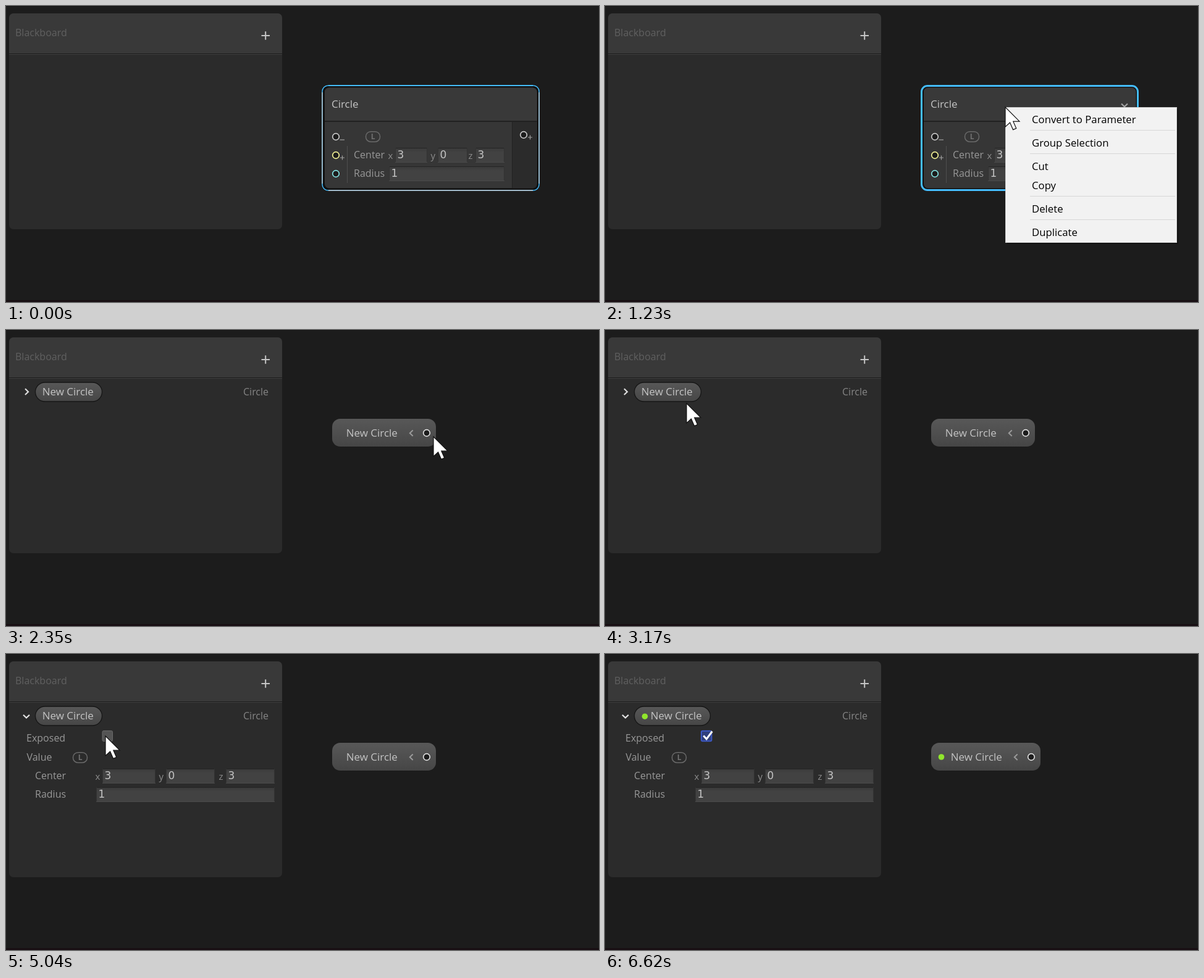
Recreate the animation shown at these times as an HTML page. Size 960x480 px, loop 7.25 s.

```html
<!DOCTYPE html>
<html lang="en">
<head>
<meta charset="utf-8">
<title>Convert to Parameter</title>
<style>
html, body { margin: 0; width: 100%; height: 100%; overflow: hidden; background: #1c1c1c; }
svg { display: block; width: 960px; height: 480px; }
text { font-family: "Open Sans", "Noto Sans", sans-serif; font-size: 16px; fill: #989898; }
.big { font-size: 17px; fill: #c4c4c4; }
.item { font-size: 16.75px; fill: #000; }
.num { font-family: "DejaVu Sans", sans-serif; font-size: 17px; fill: #c2c2c2; }
.axis { font-size: 15px; fill: #8d8d8d; }
.line { fill: none; }
</style>
</head>
<body>
<svg viewBox="0 0 960 480">
  <defs>
    <linearGradient id="pillFill" x2="0" y2="1">
      <stop stop-color="#585858"/><stop offset="1" stop-color="#464646"/>
    </linearGradient>
    <linearGradient id="fieldFill" x2="0" y2="1">
      <stop stop-color="#3a3a3a"/><stop offset=".3" stop-color="#424242"/>
    </linearGradient>
  </defs>
  <g id="scene"></g>
</svg>
<script>
const LOOP = 7250;

const rect = (x, y, w, h, fill, extra = '') =>
  `<rect x="${x}" y="${y}" width="${w}" height="${h}" fill="${fill}" ${extra}/>`;
const text = (x, y, s, cls = '', fill = '') =>
  `<text x="${x}" y="${y}" class="${cls}" ${fill && `style="fill:${fill}"`}>${s}</text>`;
const line = (d, color, width = 1) =>
  `<path class="line" d="${d}" stroke="${color}" stroke-width="${width}"/>`;
const ring = (x, y, color) =>
  `<circle cx="${x}" cy="${y}" r="5.3" fill="#1c1c1c" stroke="${color}" stroke-width="1.7"/>`;
const dot = (x, y) => `<circle cx="${x}" cy="${y}" r="4.8" fill="#90e62c"/>`;
const group = (id, ...parts) => `<g id="${id}">${parts.join('')}</g>`;

const field = (x, y, w, value) =>
  rect(x, y, w, 24, 'url(#fieldFill)') +
  line(`M${x} ${y + .5}h${w}`, '#242424') +
  line(`M${x + .5} ${y}v24M${x + w - .5} ${y}v24`, '#323232') +
  line(`M${x} ${y + 23.5}h${w}`, '#4a4a4a') +
  text(x + 3.5, y + 17, value, 'num');

const badge = (x, y) =>
  rect(x, y, 23, 16.5, 'none', 'rx="8" stroke="#6a6a6a" stroke-width="1.5"') +
  `<text x="${x + 8.2}" y="${y + 12.7}" style="font-size:12px;font-weight:700;fill:#707070">L</text>`;

// Center and Radius rows; xs holds the left edge of label, x, y and z fields
const rows = (label, y, xs, ws, radius) =>
  text(label, y + 17, 'Center') + text(label, y + 47, 'Radius') +
  ['x', 'y', 'z'].map((a, i) =>
    text(xs[i] - 11.5, y + 18, a, 'axis') + field(xs[i], y, ws[i], i === 1 ? 0 : 3)).join('') +
  field(radius, y + 30, xs[2] + ws[2] - radius, 1);

const plus = (x, y) => line(`M${x - 3.5} ${y}h7M${x} ${y - 3.5}v7`, '#a0a0a0', 1.2);

const board =
  rect(5, 12, 442, 350, '#2b2b2b', 'rx="7"') +
  '<path d="M5 77V19a7 7 0 0 1 7-7H440a7 7 0 0 1 7 7V77Z" fill="#393939"/>' +
  line('M5 77.5H447', '#191919') + line('M5 78.5H447', '#414141') +
  text(15, 49, 'Blackboard', '', '#606060') +
  line('M413.5 48H427M420.2 41.2V54.8', '#c6c6c6', 2);

const node = group('node',
  rect(511.5, 128.5, 352, 171, '#101010', 'rx="10"'),
  group('thin',
    rect(512, 129, 351, 170, 'none', 'rx="9.5" stroke="#45bdfd" stroke-width="1.5"'),
    line('M522 129H853', '#45bdfd', 2),
    line('M512 140V288M863 140V288M522 299H853', '#c4c8cb', 1.3)),
  group('thick', rect(512.5, 129.5, 350, 169, 'none', 'rx="9.5" stroke="#45bdfd" stroke-width="3"')),
  rect(516, 132.5, 343.5, 163, '#363636', 'rx="7"'),
  '<path d="M820 188H859.5V288.5a7 7 0 0 1-7 7H820Z" fill="#2b2b2b"/>',
  '<path d="M516 186V139.5a7 7 0 0 1 7-7H852.5a7 7 0 0 1 7 7V186Z" fill="#393939"/>',
  line('M516 187H859.5', '#212121', 2), line('M819.5 188V295', '#222'),
  text(527, 165, 'Circle', 'big'),
  group('fold', line('M836 158.5L841 163.2L846 158.5', '#a2a2a2', 2.2)),
  ring(534, 212, '#c8c8c8'), line('M540.5 217H548', '#a0a0a0', 1.2),
  ring(534, 242, '#f3f296'), plus(544.5, 246),
  ring(534, 272, '#84e4e4'),
  ring(838, 209, '#c8c8c8'), plus(848.5, 213),
  line('M552.5 227V287', '#4e4e4e'),
  badge(582.5, 203.7),
  rows(563, 230, [630, 699, 760], [52, 48, 47], 620));

const row = group('row',
  group('closed', line('M31 95.3L36 100.2L31 105', '#dcdcdc', 2.2)),
  group('open', line('M28 98.8L33 103.5L38 98.8', '#e6e6e6', 2.2)),
  rect(46, 83, 0, 34, 'none', 'id="pillGlow" rx="17" stroke="#327fa4" stroke-width="1.7"'),
  rect(47.5, 85, 0, 31, 'url(#pillFill)', 'id="pill" rx="15.5" stroke="#161616" stroke-width="1.3"'),
  group('pillDot', dot(64.5, 101.2)),
  group('pillText', text(58.7, 106, 'New Circle', 'big')),
  text(384, 106, 'Circle', '', '#858585'));

const details = group('details',
  text(33, 142, 'Exposed'), text(33.5, 173, 'Value'),
  badge(108.5, 159.7),
  rows(47, 186, [156, 259, 356], [86, 79, 79], 146),
  group('off', rect(156, 124.5, 16.5, 17, '#545454', 'rx="2" stroke="#6a6a6a"')),
  group('on',
    rect(156, 124.8, 16.5, 16.5, '#303f7c', 'rx="2" stroke="#3d59c4" stroke-width="2"'),
    line('M159.5 132.5L164.3 137.8L173.5 125.5', '#fff', 3)));

const token = group('token',
  rect(528, 144, 0, 45, 'url(#pillFill)', 'id="tokenBox" rx="13"'),
  group('tokenDot', dot(544.5, 167)),
  group('tokenBody',
    text(550.7, 173, 'New Circle', 'big'),
    line('M658.7 162.5L653.8 167.2L658.7 172', '#9a9a9a', 2),
    ring(681, 167, '#dedede')),
  rect(526.5, 142.5, 0, 48, 'rgba(68,180,235,.5)',
    'id="tokenGlow" rx="14" stroke="#45bdfd" stroke-width="3"'));

const menu = group('menu',
  rect(651, 167, 277, 219, '#000', 'opacity=".35"'),
  rect(648.5, 164.5, 277, 219, '#f2f2f2', 'stroke="#cfcfcf"'),
  line('M688 201.5H923M688 239.5H923M688 308.5H923M688 346.5H923', '#d7d7d7'),
  [['Convert to Parameter', 190], ['Group Selection', 228], ['Cut', 266], ['Copy', 297],
   ['Delete', 335], ['Duplicate', 373]].map(([s, y]) => text(691, y, s, 'item')).join(''));

const pick = group('pick',
  rect(651, 167, 272, 31, '#91c9f7'), text(691, 190, 'Convert to Parameter', 'item'));

const cursor = '<path id="cursor" d="M0 0V32l7.6-7 5 11.6 5.2-2.2-5-11.2H23Z" fill="#fff" stroke="#111" stroke-width="1.2"/>';

document.getElementById('scene').innerHTML =
  rect(0, 0, 960, 480, '#1c1c1c') + rect(0, 0, 960, 1, '#141414') + rect(0, 477, 960, 3, '#180f13') +
  board + row + details + node + token + menu + pick + cursor;

const el = {};
document.querySelectorAll('#scene [id]').forEach(e => el[e.id] = e);
const show = (id, on) => el[id].style.display = on ? '' : 'none';
const clamp = v => Math.max(0, Math.min(1, v));

// Pointer stops: time, x, y
const path = [
  [90, 806, 462], [300, 722, 290], [500, 662, 186], [650, 648, 164],
  [1410, 648, 164], [1660, 692, 173],
  [2840, 692, 173], [2960, 500, 160], [3080, 230, 132], [3170, 132, 119], [3240, 132, 119],
  [3400, 84, 109], [3540, 62, 105], [3610, 61, 105],
  [3850, 61, 105], [4060, 34, 101], [4290, 34, 101], [4360, 45, 118], [4530, 99, 120],
  [4600, 105, 121], [4900, 161, 133],
  [5680, 161, 133], [5860, 110, 116], [5930, 110, 116], [6000, 110, 112], [6100, 118, 110],
  [6200, 300, 132], [6300, 570, 168], [6370, 676, 181],
  [6430, 688, 210], [6500, 700, 315], [6560, 707, 416], [6620, 707, 416]
];

function pointer(t) {
  const i = path.findIndex(p => p[0] > t);
  if (i < 1) return null;
  const [t0, x0, y0] = path[i - 1], [t1, x1, y1] = path[i];
  const k = (t - t0) / (t1 - t0);
  return { x: x0 + (x1 - x0) * k, y: y0 + (y1 - y0) * k };
}

function draw(t) {
  const p = pointer(t);
  const converted = t >= 2220, expanded = t >= 4190, checked = t >= 5280, exposed = t >= 5350;
  const pillW = exposed ? 123 : 108, tokenW = exposed ? 177 : 168;
  const inside = (x, y, w, h) => p.x > x && p.x < x + w && p.y > y && p.y < y + h;
  const hover = p && t >= 2840 &&
    (inside(47, 84, pillW, 33.5) || inside(528, 144, tokenW, 45));

  show('cursor', p);
  if (p) el.cursor.setAttribute('transform', `translate(${p.x} ${p.y})`);

  show('node', !converted);
  show('thin', t < 900);
  show('thick', t >= 900);
  show('fold', t >= 900);

  show('menu', t >= 1030 && t < 2020);
  el.menu.style.opacity = clamp((t - 1030) / 200);
  show('pick', t >= 1500 && t < 2290);
  el.pick.style.opacity = t < 2020 ? 1 : .82 * clamp(1 - (t - 2070) / 220);

  show('row', converted);
  show('closed', !expanded);
  show('open', expanded);
  show('details', expanded);
  show('off', !checked);
  show('on', checked);

  show('token', converted);
  show('pillDot', exposed);
  show('tokenDot', exposed);
  show('pillGlow', hover);
  show('tokenGlow', hover);
  el.pill.setAttribute('width', pillW);
  el.pillGlow.setAttribute('width', pillW + 4);
  el.tokenBox.setAttribute('width', tokenW);
  el.tokenGlow.setAttribute('width', tokenW + 3);
  el.pillText.setAttribute('transform', `translate(${exposed ? 15 : 0})`);
  el.tokenBody.setAttribute('transform', `translate(${exposed ? 9 : 0})`);
}

const start = performance.now();
function tick() {
  draw((performance.now() - start) % LOOP);
  requestAnimationFrame(tick);
}
tick();
</script>
</body>
</html>
```
